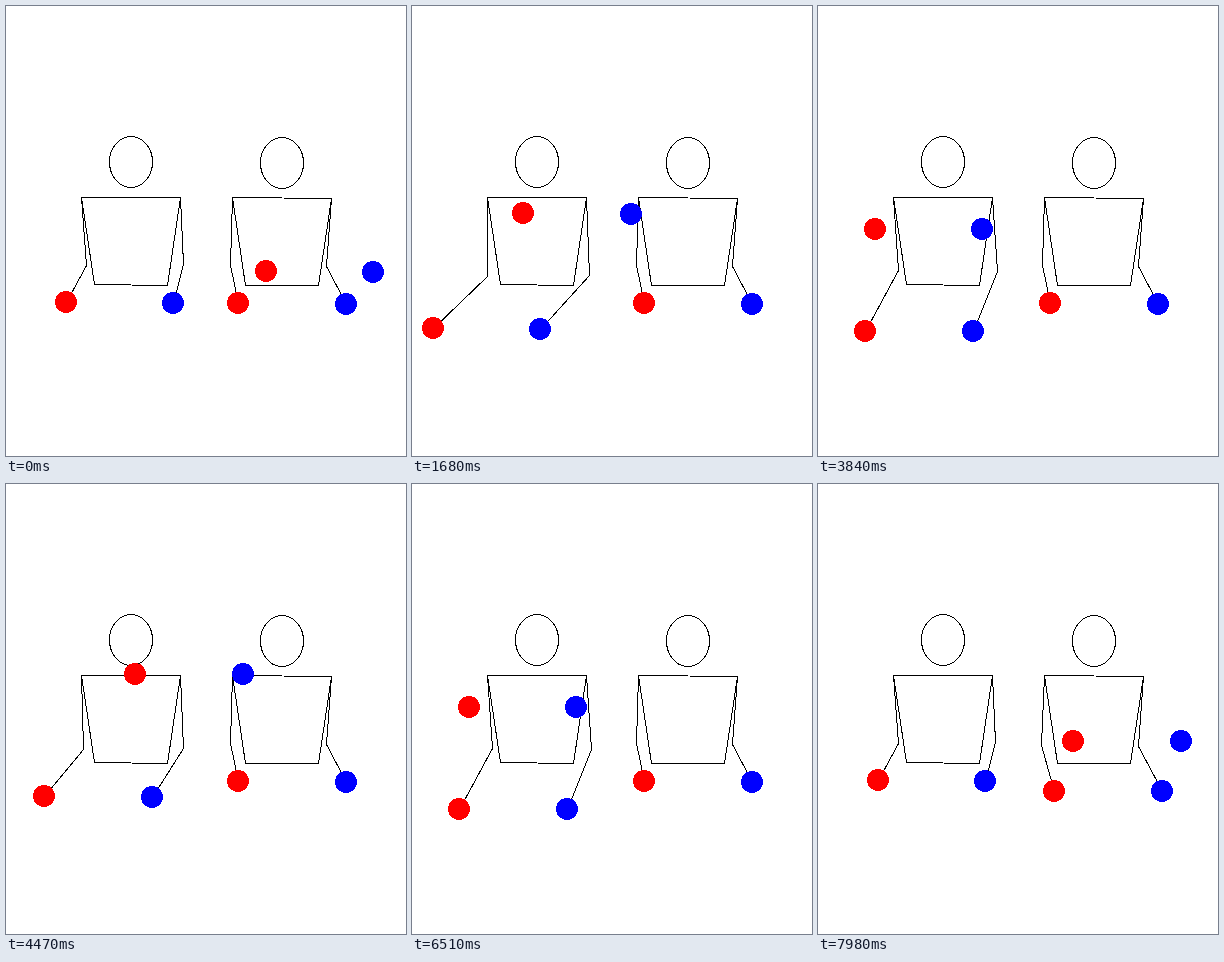
An HTML page for the animation above (8.01 s loop, 400 by 450 pixels).

```html
<!DOCTYPE html>
<html lang="en">
<head>
<meta charset="utf-8">
<title>Two jugglers passing</title>
<style>
  html, body { margin: 0; width: 100%; height: 100%; overflow: hidden; background: #fff; }
  svg { display: block; shape-rendering: crispEdges; }
  .lines { fill: none; stroke: #000; stroke-width: 1; }
</style>
</head>
<body>
<svg width="400" height="450" viewBox="0 0 400 450">
  <g class="lines" transform="translate(.5 .5)">
    <ellipse cx="124.5" cy="155.5" rx="21.5" ry="25.5"/>
    <ellipse cx="275.5" cy="156.5" rx="21.5" ry="25.5"/>
    <path d="M75 191H174L161 279L88 278Z"/>
    <path d="M226 191L325 192L312 279H239Z"/>
    <g id="arms"></g>
  </g>
  <g id="balls"></g>
</svg>
<script>
const STEP = 30;          // ms per picture
const PERIOD = 89;        // steps between throws of one hand
const CATCH = 5.2;        // steps from a throw to the next catch
const FLIGHT = PERIOD / 2 + CATCH;
const THROW = { vx: 4.5, vy: 10.2, g: 0.426 };

// Hand path after a throw: time, outward offset, drop, and their speeds
const PATH = [
  [0, 0, 0, -THROW.vx, -THROW.vy],
  [CATCH, 51.1, 19.2, 0.85, 4.7],
  [23, 0, 0, 0, 0],
  [70, 0, 0, 0, 0],
  [PERIOD, 0, 0, -THROW.vx, -THROW.vy]
];

// out: direction away from the partner's hand; lift: height change over a flight
const SIDES = [
  { x: 59.6, y: 296.4, out: -1, lift: 0.02, start: PERIOD / 2 },
  { x: 232.2, y: 297.4, out: 1, lift: -0.02, start: 0 }
];
const COLORS = [
  { fill: '#f00', dx: 0, dy: 0 },
  { fill: '#00f', dx: 107.5, dy: 0.5 }
];

// Elbow drift per unit of outward offset and drop
const NEAR = { ox: -0.184, dx: 0.084, oy: 0.237, dy: 0.067 };
const FAR = { ox: -0.067, dx: 0.1, oy: 0.17, dy: 0.168 };

// ARMS[side][color]; flip turns the elbow drift the other way
const ARMS = [
  [{ shoulder: [75, 191], elbow: [80, 259], drift: NEAR, flip: 1 },
   { shoulder: [174, 191], elbow: [177, 258], drift: FAR, flip: 1 }],
  [{ shoulder: [226, 191], elbow: [224, 259], drift: FAR, flip: -1 },
   { shoulder: [325, 192], elbow: [320, 260.4], drift: NEAR, flip: -1 }]
];

function add(parent, tag, attrs = {}) {
  const el = document.createElementNS('http://www.w3.org/2000/svg', tag);
  for (const key in attrs) el.setAttribute(key, attrs[key]);
  return document.getElementById(parent).appendChild(el);
}

for (const arm of ARMS.flat()) arm.line = add('arms', 'polyline');
for (const color of COLORS) {
  color.balls = SIDES.map(() => {
    const ball = () => add('balls', 'circle', { r: 11, fill: color.fill });
    return { held: ball(), thrown: ball() };
  });
}

function hermite(s, span, a, b, va, vb) {
  const r = 1 - s;
  return a * r * r * (1 + 2 * s) + b * s * s * (3 - 2 * s)
    + span * s * r * (va * r - vb * s);
}

function handOffset(t) {
  const i = PATH.findIndex(key => key[0] > t);
  const a = PATH[i - 1], b = PATH[i];
  const span = b[0] - a[0], s = (t - a[0]) / span;
  return [1, 2].map(k => hermite(s, span, a[k], b[k], a[k + 2], b[k + 2]));
}

function place(ball, visible, x, y) {
  ball.style.display = visible ? '' : 'none';
  ball.setAttribute('cx', Math.round(x));
  ball.setAttribute('cy', Math.round(y));
}

function draw(step) {
  SIDES.forEach((side, i) => {
    const t = (step - side.start + PERIOD) % PERIOD;
    const [out, drop] = handOffset(t);
    const handX = side.x + side.out * out, handY = side.y + drop;
    const airX = side.x - side.out * THROW.vx * t;
    const airY = side.y - THROW.vy * t + THROW.g * t * t / 2 + side.lift * t;

    COLORS.forEach(({ dx, dy, balls }, c) => {
      place(balls[i].held, t >= CATCH || t === 0, handX + dx, handY + dy);
      place(balls[i].thrown, t < FLIGHT, airX + dx, airY + dy);

      const { shoulder, elbow, drift, flip, line } = ARMS[i][c];
      const points = [
        shoulder,
        [elbow[0] + flip * (drift.ox * out + drift.dx * drop),
         elbow[1] + drift.oy * out + drift.dy * drop],
        [handX + dx, handY + dy]
      ];
      line.setAttribute('points', points.map(p => p.map(Math.round)).join(' '));
    });
  });
}

const begin = performance.now();
function tick() {
  draw(Math.floor((performance.now() - begin) / STEP) % PERIOD);
  requestAnimationFrame(tick);
}
tick();
</script>
</body>
</html>
```
